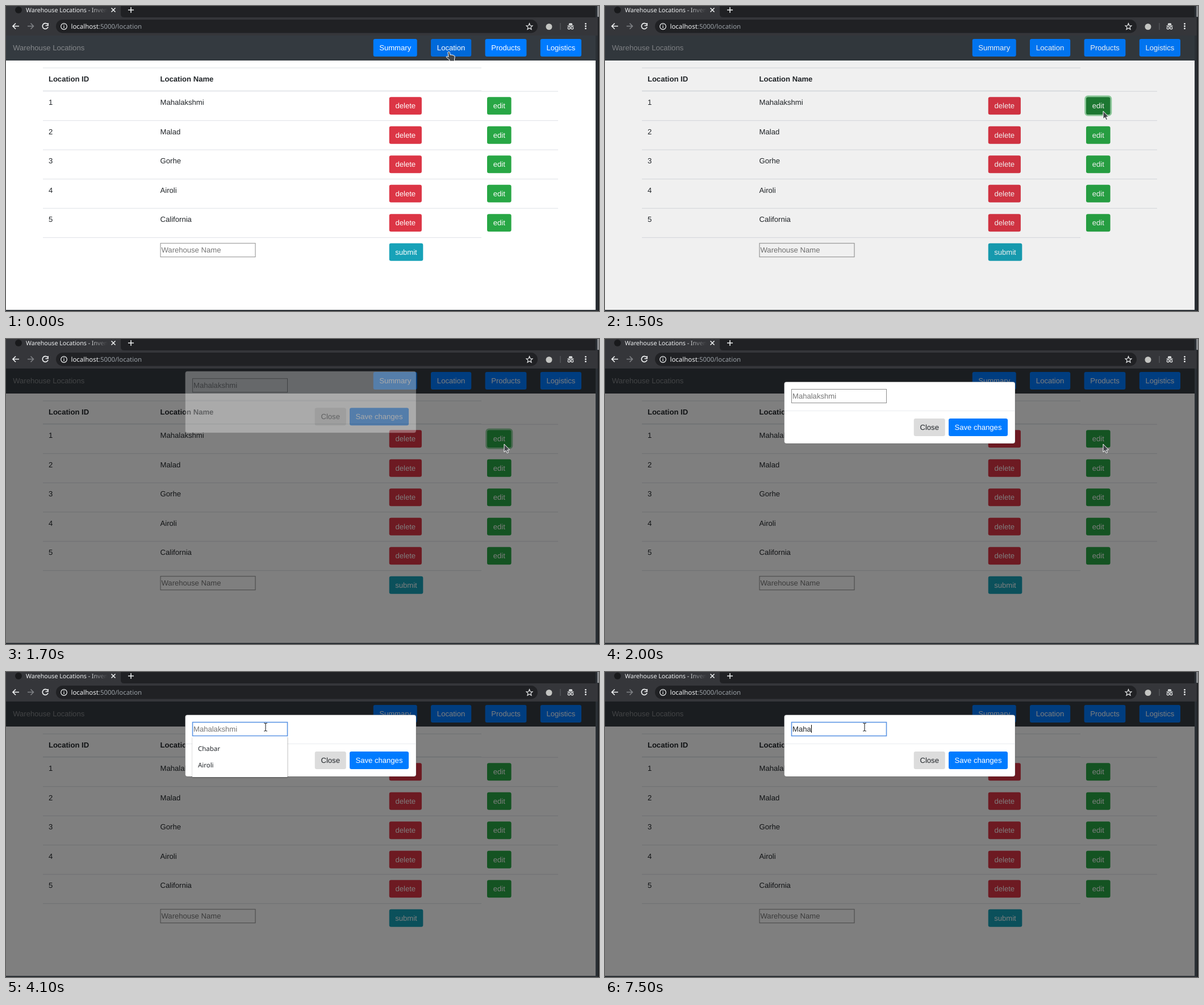
Write an HTML page that moves like this. It is 1044 px wide and 537 px high and loops after 8000 ms.

```html
<!DOCTYPE html>
<html lang="en">
<head>
<meta charset="utf-8">
<title>Warehouse Locations</title>
<style>
  html, body { margin: 0; width: 100%; height: 100%; overflow: hidden; background: #fff; }
  svg { display: block; }
  text { font: 13.08px "Liberation Sans", Arial, sans-serif; fill: #212529; white-space: pre; text-rendering: geometricPrecision; }
  .ui { font: 11.45px "Noto Sans", sans-serif; }
  .tab { font: 10.63px "Noto Sans", sans-serif; }
  .bold { font-weight: bold; }
  .mid { text-anchor: middle; }
  .hint { fill: #757575; }
  .icon { fill: none; stroke: #f1f3f4; stroke-width: 1.5; }
</style>
</head>
<body>
<svg id="stage" width="1044" height="537" viewBox="0 0 1044 537"></svg>
<script>
const LOOP = 8000, STEP = 100;
const BLUE = '#007bff', BLUE_HOVER = '#0069d9', GREEN = '#28a745', RED = '#dc3545', TEAL = '#17a2b8';

const rect = (x, y, w, h, fill, extra = '') =>
  `<rect x="${x}" y="${y}" width="${w}" height="${h}" fill="${fill}" ${extra}/>`;
const text = (x, y, label, cls = '', extra = '') =>
  `<text x="${x}" y="${y}" class="${cls}" ${extra}>${label}</text>`;
const button = (x, y, w, fill, label, id = '', ink = '#fff') =>
  rect(x, y, w, 31, fill, `rx="3.3" id="${id}"`) +
  text(x + w / 2, y + 20, label, 'mid', `style="fill:${ink}"`);
const line = (y, x1 = 65, x2 = 972, h = 1) => rect(x1, y, x2 - x1, h, '#dee2e6');
const icon = (d, extra = '') => `<path class="icon" d="${d}" ${extra}/>`;
const field = (x, y, id = '') =>
  rect(x + .5, y + .5, 167, 24, '#fff', `stroke="#8c8c8c" id="${id}"`);

const browser = () =>
  rect(0, 0, 1044, 537, '#2b3035') +
  rect(0, 0, 1038, 20, '#202124') +
  `<path d="M0 0H202V14Q202 20 208 20H0Z" fill="#35363a"/>` +
  rect(0, 20, 1042, 32, '#35363a') +
  rect(1042, 20, 2, 517, '#1d1f22') + rect(1041, 0, 3, 19, '#8b8d90') +
  `<circle cx="22" cy="7" r="6" fill="#191a1c"/>` +
  text(35, 11, 'Warehouse Locations - Inven', 'tab', 'style="fill:#f1f3f4"') +
  rect(145, 0, 34, 19, 'url(#fade)') +
  icon('M185.5 3.5L192.5 10.5M192.5 3.5L185.5 10.5M215 7H225M220 2V12') +
  icon('M23 35.5H12.5M17 30.5L12 35.5L17 40.5', 'style="stroke-width:1.7"') +
  icon('M38 35.5H48M43.5 30.5L48.5 35.5L43.5 40.5', 'style="stroke:#808286"') +
  icon('M73 32A5 5 0 1 0 74 37M74 30V34.5H69.5', 'style="stroke-width:1.7"') +
  rect(88, 24, 848, 23.5, '#202124', 'rx="11.7"') +
  icon('M107.3 36A5.3 5.3 0 1 0 96.7 36A5.3 5.3 0 1 0 107.3 36M102 35V39M102 32.5V34', 'style="stroke-width:1.2"') +
  text(114.5, 40, 'localhost<tspan fill="#9aa0a6">:5000/location</tspan>', 'ui', 'style="fill:#f1f3f4"') +
  icon('M921.5 30.5L923 34.5L927 34.7L924 37.3L925 41.3L921.5 39L918 41.3L919 37.3L916 34.7L920 34.5Z', 'style="stroke-width:1.1"') +
  `<circle cx="956" cy="36.5" r="5.5" fill="#c4c5c2"/>` +
  rect(975.5, 30, 1, 12, '#606367') +
  `<path d="M988.5 34.5H999.5V35.7H988.5ZM990.5 33.5L991.5 30.5H996.5L997.5 33.5Z" fill="#f1f3f4"/>` +
  icon('M993.2 38.8A2 2 0 1 0 989.2 38.8A2 2 0 1 0 993.2 38.8Q994 38 994.8 38.8A2 2 0 1 0 998.8 38.8A2 2 0 1 0 994.8 38.8', 'style="stroke-width:1.1"') +
  [31.3, 35.5, 39.7].map(y => `<circle cx="1020.5" cy="${y}" r="1.4" fill="#f1f3f4"/>`).join('');

const page = () => {
  const places = ['Mahalakshmi', 'Malad', 'Gorhe', 'Airoli', 'California'];
  const rows = places.map((name, i) => {
    const y = 149.7 + 51.5 * i;
    return (i ? line(y) : line(y, 837)) +
      text(74.9, y + 24.6, i + 1) + text(271.6, y + 24.6, name) +
      button(674.7, y + 10.5, 57.2, RED, 'delete') +
      (i ? '' : rect(845.6, y + 9.2, 45.4, 33.6, 'none', `rx="4.6" stroke="${GREEN}" stroke-width="2.6" id="ring"`)) +
      button(847, y + 10.5, 42.6, GREEN, 'edit', i ? '' : 'edit');
  });
  return rect(0, 52, 1038, 483, '#fff') + rect(0, 52, 1038, 44, '#343a40') +
    text(12.2, 77.7, 'Warehouse Locations', '', 'style="fill:#85888b"') +
    button(646.7, 58, 77, BLUE, 'Summary') + button(748, 58, 71.2, BLUE, 'Location', 'location') +
    button(843.6, 58, 72.8, BLUE, 'Products') + button(940.8, 58, 72.2, BLUE, 'Logistics') +
    line(108.5, 65, 837) + line(148.8, 65, 837, 1.6) +
    text(74.9, 133.1, 'Location ID', 'bold') + text(271.6, 133.1, 'Location Name', 'bold') +
    rows.join('') + line(407.2, 65, 837) +
    field(271.5, 417.3) + text(273.5, 434.3, 'Warehouse Name', 'hint') +
    button(674.7, 417.7, 59.6, TEAL, 'submit');
};

const dialog = () =>
  rect(315.5, 75.5, 406.5, 108.5, '#fff', 'rx="4" stroke="#000" stroke-opacity=".2"') +
  field(328, 88, 'field') + text(330, 105, '', '', 'id="entry"') +
  rect(0, 93, 1, 14, '#000', 'id="caret"') +
  rect(316, 126, 405.5, 1, '#e9ecef') +
  button(543.7, 140, 55, '#dcdcdc', 'Close', '', '#212529') +
  button(605, 140, 104, BLUE, 'Save changes', 'save') +
  `<g id="list">` + rect(327.5, 114, 169, 72.5, '#000', 'opacity=".25" rx="2"') +
  rect(328, 113.5, 167.5, 71.5, '#fff') +
  text(338, 138.7, 'Chabar', 'ui') + text(338, 168.2, 'Airoli', 'ui') + `</g>`;

const stage = document.getElementById('stage');
stage.innerHTML =
  `<defs><linearGradient id="fade"><stop stop-color="#35363a" stop-opacity="0"/><stop offset="1" stop-color="#35363a"/></linearGradient></defs>` +
  browser() + page() + rect(0, 52, 1038, 483, '#000', 'id="backdrop"') +
  `<g id="dialog">${dialog()}</g><path id="cursor"/>`;

const $ = id => document.getElementById(id);
const set = (id, attrs) => { for (const k in attrs) $(id).setAttribute(k, attrs[k]); };
const clamp = v => Math.min(1, Math.max(0, v));
const smooth = v => v * v * (3 - 2 * v);

// Pointer moves: start, end, target x, target y
const moves = [[0, 700, 877, 185], [2200, 2400, 690, 158], [2800, 3200, 457, 97]];
const pointer = t => moves.reduce(([x, y], [a, b, tx, ty]) => {
  const p = smooth(clamp((t - a) / (b - a)));
  return [x + (tx - x) * p, y + (ty - y) * p];
}, [780, 81]);

const shapes = {
  hand: 'M-2 1Q-2-.5-.5-.5T1.2 1L2 5Q5 4.5 8 6Q10.5 6.5 10.2 9L9.5 13V16H1V14L-4.5 9.5Q-5.5 7.5-3.5 7.5L-1 8.5Z',
  arrow: 'M0 0V14L3.2 11.2L5.3 15.8L7.6 14.8L5.6 10.4L9.5 10Z',
  beam: 'M-3-7Q0-7 0-5.5V5.5Q0 7-3 7M3-7Q0-7 0-5.5M0 5.5Q0 7 3 7'
};

const typing = [[4900, 'M'], [5300, 'Maha'], [6100, 'Mahad'], [6300, 'Mahada'], [7100, 'Mahad'], [7300, 'Maha']];

function draw(t) {
  const [x, y] = pointer(t);
  const over = (l, top, r, b) => x >= l && x <= r && y >= top && y <= b;
  const onLocation = over(748, 58, 819, 89);
  const onEdit = t < 1500 && over(847, 160, 890, 191);
  const onSave = t >= 2000 && over(605, 140, 709, 171);
  const onField = t >= 2000 && over(328, 88, 496, 113);

  set('location', { fill: onLocation ? BLUE_HOVER : BLUE });
  set('save', { fill: onSave ? BLUE_HOVER : BLUE });
  set('edit', { fill: t >= 1300 && t <= 1500 ? '#1e7e34' : onEdit ? '#218838' : GREEN });
  set('ring', { opacity: .5 * clamp((t - 1280) / 150) * clamp((1850 - t) / 150) });

  const slide = 1 - clamp((t - 1650) / 300);
  set('backdrop', { opacity: .5 * clamp((t - 1482) / 150) });
  set('dialog', { opacity: clamp((t - 1650) / 150), transform: `translate(0 ${-27 * slide * slide})` });

  const focused = t >= 3500;
  set('field', { stroke: focused ? '#5b94e3' : '#8c8c8c', 'stroke-width': focused ? 1.6 : 1 });
  set('list', { visibility: focused && t < 4900 ? 'visible' : 'hidden' });

  const typed = typing.reduce((now, [at, value]) => t >= at ? value : now, '');
  const entry = $('entry');
  entry.textContent = typed || 'Mahalakshmi';
  entry.setAttribute('class', typed ? '' : 'hint');
  const caretOn = focused && t < 4100 || t >= 4900 && t < 6900 || t >= 7500;
  set('caret', {
    x: Math.round(330 + (typed ? entry.getComputedTextLength() : 0)),
    visibility: caretOn ? 'visible' : 'hidden'
  });

  const beam = onField;
  set('cursor', {
    d: shapes[beam ? 'beam' : onLocation || onEdit || onSave ? 'hand' : 'arrow'],
    transform: `translate(${x} ${y})`,
    fill: beam ? 'none' : '#43474b',
    stroke: beam ? '#3a3d40' : '#fff',
    'stroke-width': beam ? 1.2 : 1
  });
}

function tick() {
  draw(Math.floor(performance.now() % LOOP / STEP) * STEP);
  requestAnimationFrame(tick);
}
tick();
</script>
</body>
</html>
```
